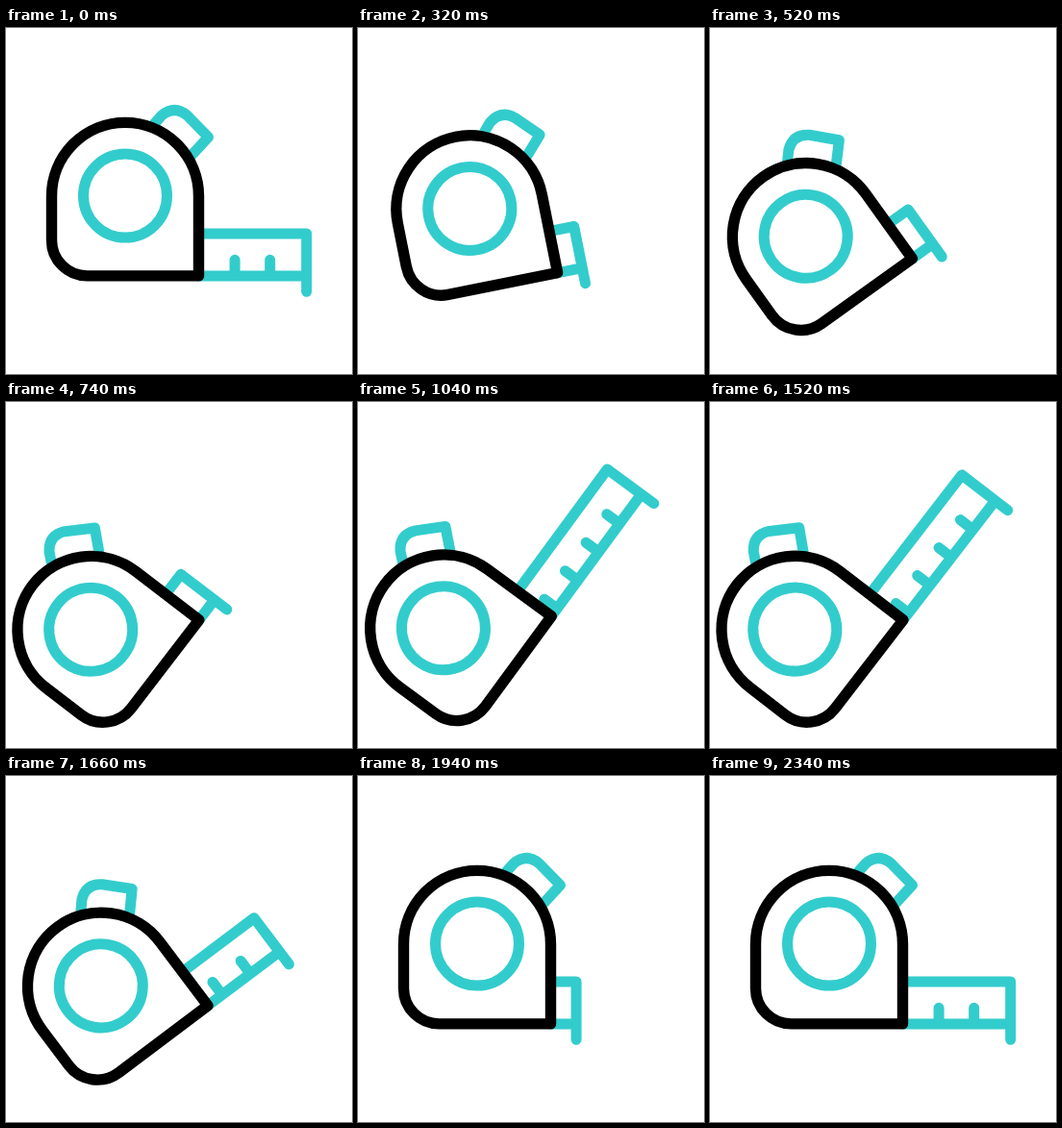
These frames come from a looping animation (360 by 360 pixels, 2.4 s). An HTML page:

```html
<!DOCTYPE html>
<html lang="en">
<head>
<meta charset="utf-8">
<title>Tape measure</title>
<style>
  html, body { margin: 0; width: 100%; height: 100%; overflow: hidden; background: #fff; }
  svg { display: block; width: 100%; height: 100%; }
  path, circle { fill: none; stroke: #3cc; stroke-width: 11; stroke-linecap: round; stroke-linejoin: round; }
  #case { fill: #fff; stroke: #000; stroke-width: 11.4; }
</style>
</head>
<body>
<svg viewBox="0 0 360 360">
  <g id="tool">
    <path id="tape"/>
    <path d="M154 100L162 91Q175.3 80 188.5 91L210.5 113.5L193.5 132"/>
    <path id="case" d="M200.5 257.9H84.5A37 37 0 0 1 47.5 220.9V174.9A76.5 76.5 0 0 1 200.5 174.9Z"/>
    <circle cx="124" cy="174.6" r="43.5"/>
  </g>
</svg>
<script>
const LOOP = 2400;
const tool = document.getElementById('tool');
const tape = document.getElementById('tape');

// Sine ease from 0 to 1 between two times
const ease = (t, start, end) => {
  const u = Math.min(1, Math.max(0, (t - start) / (end - start)));
  return (1 - Math.cos(Math.PI * u)) / 2;
};
const bump = (t, start, end) =>
  t > start && t < end ? Math.sin(Math.PI * (t - start) / (end - start)) ** 2 : 0;

function tapePath(hook) {
  let d = `M200 214H${hook}V274.3M200 257.9H${hook}`;
  for (let x = hook - 38; x > 202; x -= 36.6) d += `M${x} 241.3V257`;
  return d;
}

function draw(t) {
  const tilt = ease(t, 122, 772) - ease(t, 1495, 1945);
  const recoil = bump(t, 770, 1220) + bump(t, 1220, 1460);
  const hook = 312.7 - 86 * ease(t, 0, 280) + 203 * ease(t, 760, 1232)
    - 203 * ease(t, 1240, 1930) + 86 * ease(t, 1930, 2195);

  const x = -36 * tilt + recoil;
  const y = 62.5 * tilt - 2 * recoil;
  const angle = -52.8 * tilt - recoil;
  tool.setAttribute('transform', `translate(${x} ${y}) rotate(${angle} 124 174.6)`);
  tape.setAttribute('d', tapePath(hook));
}

function tick() {
  draw(performance.now() % LOOP);
  requestAnimationFrame(tick);
}
tick();
</script>
</body>
</html>
```
